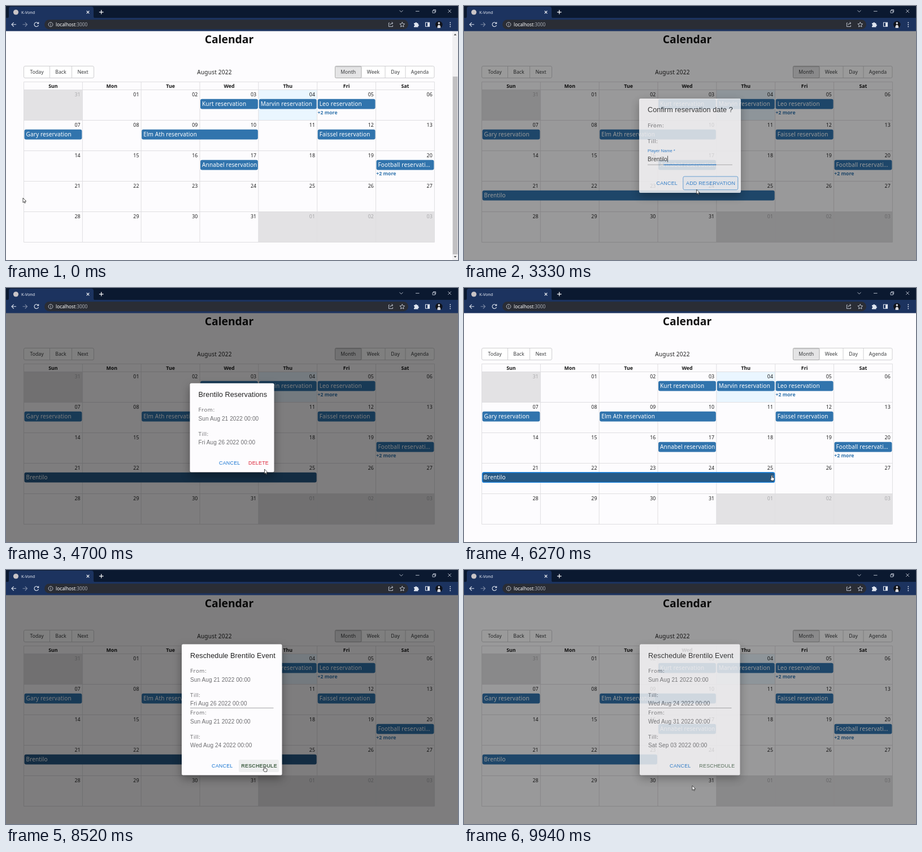
Write an HTML page that moves like this. It is 800 px wide and 450 px high and loops after 9970 ms.

```html
<!DOCTYPE html>
<html lang="en">
<head>
<meta charset="utf-8">
<title>Calendar</title>
<style>
  html, body { margin: 0; width: 100%; height: 100%; overflow: hidden; background: #fdfcfe; }
  svg { display: block; width: 800px; height: 450px; }
  text { font-family: "Noto Sans", "Open Sans", sans-serif; white-space: pre; }
  .ui { font-family: "Liberation Sans", Arial, sans-serif; }
  .paper { filter: drop-shadow(0 6px 8px rgba(0, 0, 0, .35)); }
</style>
</head>
<body>
<svg id="stage" viewBox="0 0 800 450"></svg>
<script>
const LOOP = 9970;
const X0 = 31.5, COL = 103.84, Y0 = 148.5, ROW = 54;
const BLUE = '#3174ad', PICKED = '#265985', LINE = '#dfdee1', OFF = '#e3e2e4';
const LINK = '#1976d2', GREY = '#6d6d70', PLAYER = 'Brentilo';
const stage = document.getElementById('stage');

function el(tag, attrs, parent = stage) {
  const node = document.createElementNS('http://www.w3.org/2000/svg', tag);
  for (const key in attrs) node.setAttribute(key, attrs[key]);
  parent.appendChild(node);
  return node;
}
const group = (parent, attrs = {}) => el('g', attrs, parent);
const rect = (parent, x, y, width, height, fill, more) =>
  el('rect', { x, y, width, height, fill, ...more }, parent);
const stroke = (parent, d, color, width = 1, more) =>
  el('path', { d, fill: 'none', stroke: color, 'stroke-width': width, ...more }, parent);
function text(parent, str, x, y, size, fill, more) {
  const node = el('text', { x, y, 'font-size': size, fill, ...more }, parent);
  node.textContent = str;
  return node;
}
const show = (node, on) => node.setAttribute('visibility', on ? 'visible' : 'hidden');
const colX = c => X0 + c * COL;
const rowY = r => Y0 + r * ROW;
const two = n => String(n).padStart(2, '0');

// ---- page ----
const page = group(stage);
rect(page, 0, 44, 800, 406, '#fdfcfe');
text(page, 'Calendar', 395, 66, 19.3, '#111', { 'text-anchor': 'middle', 'font-weight': 600 });
text(page, 'August 2022', 369, 120.5, 10.1, '#222', { 'text-anchor': 'middle', 'letter-spacing': .2 });

function buttons(edges, labels, active) {
  const last = edges.length - 1;
  rect(page, edges[0], 106.5, edges[last] - edges[0], 21, '#fff', { rx: 2.5, stroke: '#cfcfd1' });
  labels.forEach((label, i) => {
    const x = edges[i], w = edges[i + 1] - x;
    if (label === active) {
      rect(page, x, 106.5, w, 21, '#e4e4e5', { rx: 2, stroke: '#adadad' });
      stroke(page, `M${x + 1} 107.7h${w - 2}`, '#cdcdcf', 1.5);
    } else if (i && labels[i - 1] !== active) {
      stroke(page, `M${x} 106.5v21`, '#cfcfd1');
    }
    text(page, label, x + w / 2, 120, 8.7, '#3a3c3e', { 'text-anchor': 'middle' });
  });
}
buttons([31.5, 77.5, 116.5, 155.5], ['Today', 'Back', 'Next']);
buttons([582.5, 629, 671, 707, 758], ['Month', 'Week', 'Day', 'Agenda'], 'Month');

const offDays = i => i === 0 || i > 31;
for (let i = 0; i < 35; i++) {
  const fill = offDays(i) ? OFF : i === 4 ? '#eaf6ff' : null;
  if (fill) rect(page, colX(i % 7), rowY(i / 7 | 0), COL, ROW, fill);
}
const picked = rect(page, X0, rowY(3), 0, ROW, OFF);

let grid = `M${X0} 134.5H${colX(7)}V${rowY(5)}H${X0}Z`;
for (let r = 0; r < 5; r++) grid += `M${X0} ${rowY(r)}H${colX(7)}`;
for (let c = 1; c < 7; c++) grid += `M${colX(c)} 134.5V${rowY(5)}`;
stroke(page, grid, LINE);

['Sun', 'Mon', 'Tue', 'Wed', 'Thu', 'Fri', 'Sat'].forEach((day, c) =>
  text(page, day, colX(c + .5), 145, 8.8, '#151515', { 'text-anchor': 'middle', 'font-weight': 700 }));
for (let i = 0; i < 35; i++) {
  const day = i === 0 ? 31 : i > 31 ? i - 31 : i;
  text(page, two(day), colX(i % 7 + 1) - 3.6, rowY(i / 7 | 0) + 11.8, 8.8,
    offDays(i) ? '#a9a9ab' : '#222', { 'text-anchor': 'end', 'letter-spacing': .1 });
}

function makeBar(label) {
  const g = group(page);
  const box = rect(g, 0, 0, 0, 17.6, BLUE, { rx: 3 });
  const name = text(g, label, 0, 0, 10, '#fff', { 'letter-spacing': .15 });
  return { g, box, name };
}
function placeBar(bar, row, from, to, top = 16.3) {
  const x = colX(from) + 1, y = rowY(row) + top;
  bar.box.setAttribute('x', x);
  bar.box.setAttribute('y', y);
  bar.box.setAttribute('width', Math.max(0, colX(to) - x - 1));
  bar.name.setAttribute('x', x + 3);
  bar.name.setAttribute('y', y + 12.4);
}
[
  ['Kurt reservation', 0, 3, 4], ['Marvin reservation', 0, 4, 5], ['Leo reservation', 0, 5, 6],
  ['Gary reservation', 1, 0, 1], ['Elm Ath reservation', 1, 2, 4], ['Faissel reservation', 1, 5, 6],
  ['Annabel reservation', 2, 3, 4], ['Football reservati…', 2, 6, 7]
].forEach(([label, row, from, to]) => placeBar(makeBar(label), row, from, to));
[[5, 0], [6, 2]].forEach(([c, r]) =>
  text(page, '+2 more', colX(c) + .8, rowY(r) + 43.8, 8.7, BLUE, { 'font-weight': 600 }));

const booking = makeBar(PLAYER);
const grips = stroke(booking.g, 'M35 332v7M36.8 332v7M545.2 332v7M547 332v7', '#c9d8e5', .6);

const scroll = group(page);
rect(scroll, 790, 44, 10, 406, '#f1f0f2');
rect(scroll, 790.7, 125, 8.6, 315, '#c1c0c2');
el('path', { d: 'M792.6 52l2.4-3 2.4 3zM792.6 443l2.4 3 2.4-3z', fill: '#555' }, scroll);

// ---- dialogs ----
const shade = rect(stage, 0, 44, 800, 406, '#000', { opacity: 0 });

function paper(x, y, w, h, title) {
  const g = group(stage, { opacity: 0 });
  rect(g, x, y, w, h, '#fdfcfe', { rx: 2.5, class: 'paper' });
  text(g, title, x + 15, y + 24.3, 12.65, '#222', { class: 'ui', 'letter-spacing': .07 });
  return g;
}
const caption = (g, str, x, y) =>
  text(g, str, x, y + 3.7, 9.7, GREY, { 'letter-spacing': .55, 'font-weight': 500 });
const value = (g, str, x, y, fill = GREY) =>
  text(g, str, x, y + 3.7, 10.05, fill, { class: 'ui', 'letter-spacing': .08 });
const action = (g, str, x, y, fill) =>
  text(g, str, x, y + 3.2, 8.9, fill, { class: 'ui', 'letter-spacing': .25 });
function range(g, x, y, from, till) {
  caption(g, 'From:', x, y);
  value(g, from + ' 2022 00:00', x, y + 15.5);
  caption(g, 'Till:', x, y + 42.5);
  value(g, till + ' 2022 00:00', x, y + 58);
}

function bookDialog(y, filled) {
  const h = filled ? 196 : 167, g = paper(310, y, 180, h, 'Confirm reservation date ?');
  if (filled) range(g, 325, y + 47, 'Sun Aug 21', 'Fri Aug 26');
  else {
    caption(g, 'From:', 325, y + 47);
    caption(g, 'Till:', 325, y + 75);
  }
  const end = y + h;
  text(g, 'Player Name *', 325, end - 72.2, 7.55, LINK, { class: 'ui' });
  const input = value(g, '', 325, end - 60, '#222');
  const caret = rect(g, 325, end - 65.5, .8, 11, '#111');
  stroke(g, `M325 ${end - 49.7}h150`, '#8d8d8f', .7);
  const line = stroke(g, '', LINK, 1.3);
  const ring = rect(g, 387.8, end - 29, 97, 23.6, '#1976d20a', { rx: 2.5, stroke: '#4d98dc', 'stroke-width': .9 });
  action(g, 'CANCEL', 340.5, end - 17, LINK);
  action(g, 'ADD RESERVATION', 393, end - 17, LINK);
  return { g, input, caret, line, ring, base: end - 49.7 };
}

function moveDialog(till, newFrom, newTill) {
  const g = paper(311, 131.5, 177.5, 232, `Reschedule ${PLAYER} Event`);
  range(g, 326, 178.7, 'Sun Aug 21', till);
  stroke(g, 'M326 244.5h147.5', '#9b9b9d', .9);
  range(g, 326, 252.7, newFrom, newTill);
  const hover = rect(g, 412, 336, 71, 22, '#eeeff0', { rx: 2.5 });
  action(g, 'CANCEL', 364, 347, LINK);
  const ok = action(g, 'RESCHEDULE', 416.3, 347, '#46644a');
  return { g, hover, ok };
}

const book = bookDialog(149.5, true);
const booked = bookDialog(164, false);
const info = paper(325.5, 168.8, 149, 157.5, `${PLAYER} Reservations`);
range(info, 340.5, 215.7, 'Sun Aug 21', 'Fri Aug 26');
action(info, 'CANCEL', 377, 310, LINK);
action(info, 'DELETE', 429, 310, '#dc2236');
const shrink = moveDialog('Fri Aug 26', 'Sun Aug 21', 'Wed Aug 24');
const shift = moveDialog('Wed Aug 24', 'Wed Aug 31', 'Sat Sep 03');

// ---- browser frame ----
const bar = group(stage);
rect(bar, 0, 0, 800, 22, '#0b1930');
rect(bar, 0, 21, 800, 23.5, '#1c335f');
el('path', { d: 'M1 22q4 0 4-4V5q0-4 4-4H151q4 0 4 4V18q0 4 4 4z', fill: '#1c335f' }, bar);
el('circle', { cx: 17.5, cy: 11, r: 4.6, fill: '#c9c4c6' }, bar);
text(bar, 'K-Vond', 27, 13.5, 7.2, '#e9edf5');
rect(bar, 68, 24.3, 644, 17, '#2a2d35', { rx: 8.5 });
text(bar, 'localhost', 88, 35.8, 8.3, '#fff');
text(bar, ':3000', 123, 35.8, 8.3, '#a9adb5');
const ICON = '#dfe5f0';
stroke(bar, 'M142.7 8.7l4.6 4.6m0-4.6l-4.6 4.6M168.7 7v7.6M164.9 10.8h7.6', '#fff', 1.2);
stroke(bar, 'M696.5 7.7l3 3 3-3M725 9.3h6.5M755 8h4.2v4.2H755zM756.4 8v-1.4h4.2v4.2h-1.4M782.3 6.3l5.6 5.6m0-5.6l-5.6 5.6', ICON, .8);
stroke(bar, 'M18 32.8H10m3.7-3.7L10 32.8l3.7 3.7', ICON, 1.1);
stroke(bar, 'M29.5 32.8h8m-3.7-3.7l3.7 3.7-3.7 3.7', '#7d8aa5', 1.1);
stroke(bar, 'M57 30.6a3.8 3.8 0 1 0 .5 3.2M57.7 28.6v2.7H55', ICON, 1.1);
stroke(bar, 'M79 28.9a3.9 3.9 0 1 0 .01 0M79 32.2v2.8M79 30.5v.9', '#c5c9d1', .9);
stroke(bar, 'M679 30h-1.6v6.5h7V34M679.5 34q.5-3.6 5-3.6m-1.8-2l2.2 2-2.2 2', ICON, .8);
stroke(bar, 'M701.3 28.6l1.3 2.9 3.1.3-2.4 2.1.7 3.1-2.7-1.6-2.7 1.6.7-3.1-2.4-2.1 3.1-.3z', ICON, .8);
el('path', { d: 'M722 30.3h2.2a1.5 1.5 0 1 1 3 0h2.2v2.2a1.5 1.5 0 1 1 0 3v2H722v-2.3a1.3 1.3 0 1 0 0-2.6z', fill: ICON }, bar);
stroke(bar, 'M742.5 29.3h7v7h-7z', ICON, 1.1);
rect(bar, 746, 29.5, 3.5, 6.8, ICON);
el('circle', { cx: 766.3, cy: 33, r: 6.2, fill: '#10131b' }, bar);
el('path', { d: 'M763.3 38.4q.2-5 3-5.2 2.8.2 3 5.2-3 1.4-6 0zM766.3 28.6a1.8 1.8 0 1 0 .01 0', fill: '#d9d9de' }, bar);
[29.5, 33, 36.5].forEach(cy => el('circle', { cx: 786.3, cy, r: .9, fill: ICON }, bar));

// ---- pointer ----
const pointer = group(stage);
const ink = { fill: '#fff', stroke: '#222', 'stroke-width': .8, 'stroke-linejoin': 'round' };
const arrow = el('path', { d: 'M0 0V8.2L1.9 6.5 3.1 9.2 4.4 8.6 3.2 6H5.8Z', ...ink }, pointer);
const hand = el('path', { d: 'M-.9 5.5V.6Q0-.6.9.6V3.4L4 4.2Q4.8 4.5 4.7 5.4L4 9.3H-.2L-2.7 6Q-2.4 4.7-.9 5.8Z', ...ink }, pointer);

// ---- timing ----
const clamp = v => Math.min(1, Math.max(0, v));
const bez = (a, b, s) => 3 * a * s * (1 - s) ** 2 + 3 * b * s * s * (1 - s) + s ** 3;
function ease(x) {
  x = clamp(x);
  let lo = 0, hi = 1;
  for (let i = 0; i < 18; i++) {
    const mid = (lo + hi) / 2;
    if (bez(.4, .2, mid) < x) lo = mid; else hi = mid;
  }
  return bez(0, 1, lo);
}
const fade = (t, open, close) => t < close ? ease((t - open) / 225) : 1 - ease((t - close) / 195);
const within = (t, a, b) => t >= a && t < b;

const OPEN = 1790, BOOK = 3285, INFO = 4000, CANCEL = 5250;
const GRAB = 6900, DROP = 7610, MOVE = 8570, GRAB2 = 9180, DROP2 = 9825;

const path = [
  [0, 30, 340], [30, 30, 340], [360, 62, 338.5], [790, 62, 338.5], [1660, 478, 343], [2500, 478, 343],
  [3180, 411.5, 325], [3400, 411.5, 325], [3790, 440, 335], [4000, 440, 335], [4680, 457.5, 321],
  [4800, 457.5, 321], [5150, 400, 312], [5300, 400, 312], [5970, 543.5, 331], [6300, 544.5, 332],
  [6670, 546, 333], [6880, 546, 333], [7520, 300, 334], [7640, 300, 334], [8420, 457.5, 348],
  [8640, 457.5, 348], [9060, 112, 334], [9160, 112, 334], [9790, 404, 382], [LOOP, 404, 382]
];
const hands = [[3700, 4080], [5060, 5300], [5900, 7610], [8330, 8720], [8980, 9800]];

function at(t) {
  const i = path.findIndex(p => p[0] > t);
  const [ta, xa, ya] = path[i - 1], [tb, xb, yb] = path[i];
  const u = (t - ta) / (tb - ta), k = u * u * (3 - 2 * u);
  return [xa + (xb - xa) * k, ya + (yb - ya) * k];
}

function drawBooking(t, x, y) {
  show(booking.g, t >= BOOK);
  const col = Math.floor((x - X0) / COL);
  if (within(t, GRAB, DROP)) placeBar(booking, 3, 0, Math.max(1, col + 1), 1);
  else if (within(t, GRAB2, DROP2)) placeBar(booking, Math.floor((y - Y0) / ROW), col, Math.min(7, col + 3), 1);
  else placeBar(booking, 3, 0, t < MOVE ? 5 : 3);
  booking.box.setAttribute('fill', within(t, INFO, MOVE) ? PICKED : BLUE);
  booking.box.setAttribute('stroke', within(t, CANCEL + 150, GRAB) ? '#1e88e5' : 'none');
  booking.box.setAttribute('stroke-width', 1.4);
  show(grips, within(t, 5920, GRAB));
}

function drawBook(d, t) {
  const typed = PLAYER.slice(0, Math.max(0, Math.floor((t - 2390) / 75) + 1));
  if (d.input.textContent !== typed) d.input.textContent = typed;
  d.caret.setAttribute('x', 325.4 + (typed ? d.input.getComputedTextLength() : 0));
  d.caret.setAttribute('opacity', t < 2390 && (t - OPEN) % 1000 > 500 ? 0 : 1);
  const half = 75 * ease((t - OPEN - 60) / 200) * (1 - ease((t - 3270) / 200));
  d.line.setAttribute('d', `M${400 - half} ${d.base}h${2 * half}`);
  d.ring.setAttribute('opacity', t >= 3220 ? 1 : 0);
}

function draw(t) {
  const [x, y] = at(t);
  pointer.setAttribute('transform', `translate(${x} ${y})`);
  const isHand = hands.some(([a, b]) => within(t, a, b));
  show(hand, isHand);
  show(arrow, !isHand);

  const days = within(t, 790, OPEN) ? Math.floor((x - X0) / COL) + 1 : 0;
  picked.setAttribute('width', days * COL);
  drawBooking(t, x, y);

  const ask = fade(t, OPEN, BOOK);
  const layers = [
    [book.g, t < BOOK ? ask : 0], [booked.g, t < BOOK ? 0 : ask],
    [info, fade(t, INFO, CANCEL)], [shrink.g, fade(t, DROP, MOVE)], [shift.g, fade(t, DROP2, LOOP)]
  ];
  let dim = 0;
  for (const [g, k] of layers) {
    g.setAttribute('opacity', k);
    show(g, k > 0);
    dim = Math.max(dim, k);
  }
  shade.setAttribute('opacity', dim / 2);
  scroll.setAttribute('opacity', dim > 0 ? 0 : 1);
  if (ask > 0) drawBook(t < BOOK ? book : booked, t);

  const over = within(t, 8330, 8800);
  shrink.hover.setAttribute('opacity', over ? 1 : 0);
  shrink.ok.setAttribute('font-weight', over ? 700 : 400);
  shift.hover.setAttribute('opacity', 0);
}

function tick() {
  draw(performance.now() % LOOP);
  requestAnimationFrame(tick);
}
tick();
</script>
</body>
</html>
```
